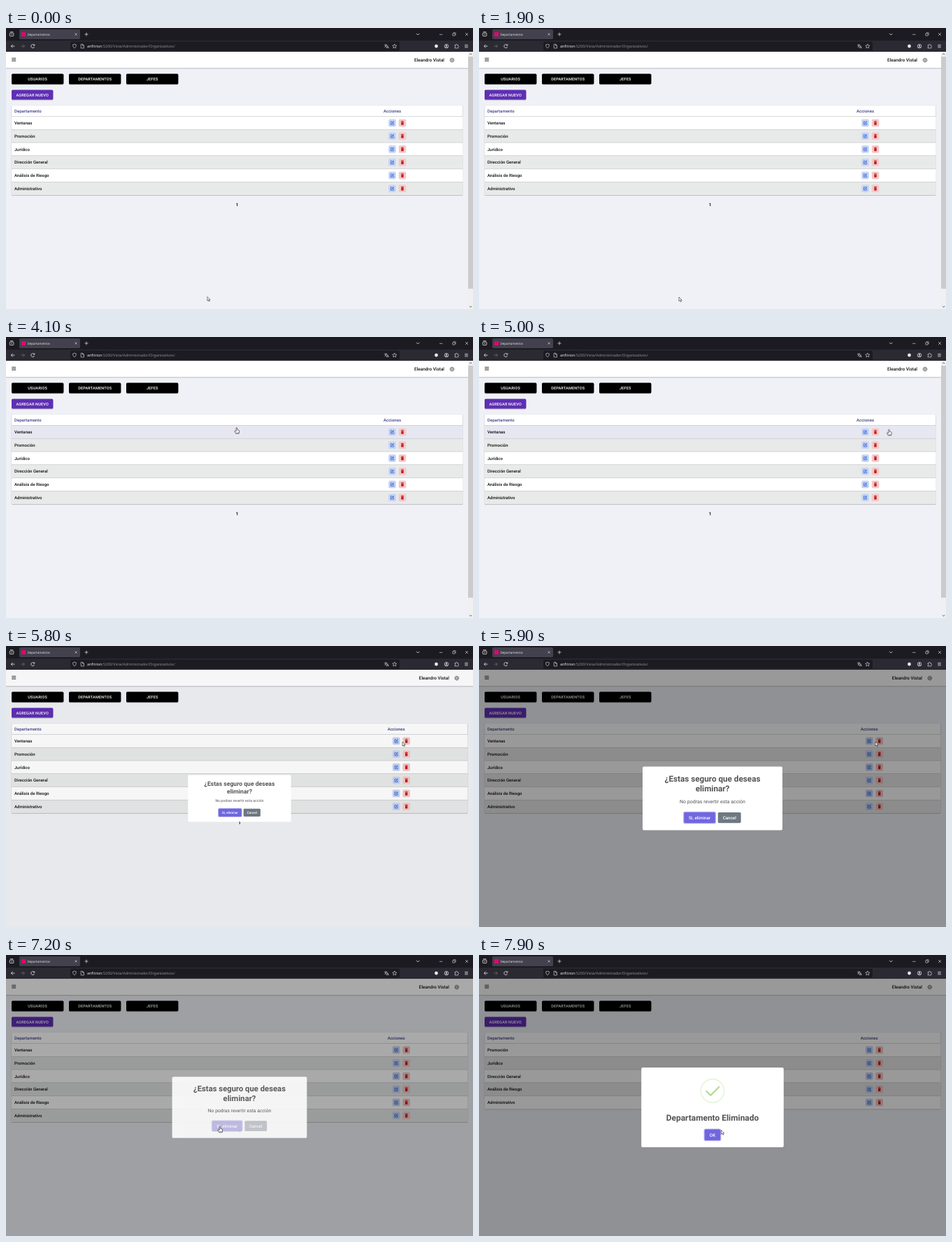
Write an HTML page that moves like this. It is 668 by 402 pixels and loops after 8000 ms.

```html
<!DOCTYPE html>
<html lang="es">
<head>
<meta charset="utf-8">
<title>Departamentos</title>
<style>
html, body { margin: 0; width: 100%; height: 100%; overflow: hidden; background: #f0f1f6; }
svg { display: block; width: 668px; height: 402px; font-family: Roboto, sans-serif; text-rendering: geometricPrecision; }
</style>
</head>
<body>
<svg id="stage" viewBox="0 0 668 402"></svg>
<script>
const LOOP = 8000, TICK = 100;
const OPEN_ASK = 5791, CLOSE_ASK = 7184, OPEN_DONE = 7250;
const ROW_TOP = 126.5, ROW_H = 18.75;
const ROWS = ['Ventanas', 'Promoción', 'Jurídico', 'Dirección General', 'Análisis de Riesgo', 'Administrativo'];
const UI = "'Open Sans', sans-serif";

const stage = document.getElementById('stage');
const clamp = v => Math.max(0, Math.min(1, v));
const lerp = (a, b, p) => a + (b - a) * p;

// SVG helpers
const rect = (x, y, w, h, fill, r = 0, more = '') =>
  `<rect x="${x}" y="${y}" width="${w}" height="${h}" rx="${r}" fill="${fill}" ${more}/>`;
const circle = (x, y, r, fill, more = '') => `<circle cx="${x}" cy="${y}" r="${r}" fill="${fill}" ${more}/>`;
const line = (d, color, w = .6, fill = 'none', more = '') =>
  `<path d="${d}" stroke="${color}" stroke-width="${w}" fill="${fill}" stroke-linejoin="round" ${more}/>`;
const text = (x, y, size, str, fill, weight = 500, anchor = 'start', more = '') =>
  `<text x="${x}" y="${y}" font-size="${size}" font-weight="${weight}" fill="${fill}" text-anchor="${anchor}" ${more}>${str}</text>`;
const group = (transform, body, more = '') => `<g transform="${transform}" ${more}>${body}</g>`;
const at = (x, y, body) => group(`translate(${x} ${y})`, body);

// Piecewise path through [time, x, y] points, eased between points
const PATH = [
  [0, 288, 384.5], [1800, 288, 384.5], [1900, 286, 385], [2700, 181.5, 322], [2900, 181.5, 322],
  [3400, 209.5, 149.3], [3800, 239, 129], [4700, 590, 131], [4800, 600, 133], [5000, 586.5, 132.2],
  [5300, 566, 140], [5400, 566, 140], [5600, 567, 137.2], [5900, 567, 137.2],
  [6600, 305.5, 244.8], [6900, 305.5, 244.8], [7000, 306, 245], [7200, 306, 245.2], [7800, 346.5, 250.8], [8000, 346.5, 250.5]
];
function pointer(t) {
  const i = PATH.findIndex(p => p[0] > t);
  const [t0, x0, y0] = PATH[i - 1], [t1, x1, y1] = PATH[i];
  const p = (t - t0) / (t1 - t0), e = p * p * (3 - 2 * p);
  return { x: lerp(x0, x1, e), y: lerp(y0, y1, e) };
}

function browser() {
  const c = '#e8e8ec', w = .7;
  return rect(0, 0, 668, 34, '#1c1b22') + rect(0, 18, 668, 16, '#2b2a33')
    + rect(5.3, 7, 5.6, 4.6, 'none', 1, `stroke="${c}" stroke-width=".8"`) + line('M6 5.6H10.2M7 9.2H9.2', c, w)
    + rect(19, 2, 87, 14, '#42414d', 1.8) + rect(22, 6, 6, 6, '#e5006d')
    + text(30.5, 10.7, 4.45, 'Departamentos', '#f2f2f5', 400, 'start', `font-family="${UI}"`)
    + line('M98.6 7.5l3 3m0-3l-3 3', c) + line('M115 6.5v5M112.5 9h5', c, w)
    + line('M587 7.8l2.2 2.2 2.2-2.2', c, .8) + line('M620 9.3h4.4M657 7l4 4m0-4l-4 4', c)
    + rect(638.8, 7.8, 3.3, 3.3, 'none', .4, `stroke="${c}" stroke-width=".6"`) + line('M640 7.7v-1h3.2v3.2h-1', c, .5)
    + line('M12.5 26H7.3M9.7 23.6L7.3 26l2.4 2.4', c, .8) + line('M21.3 26h5.2M24.1 23.6l2.4 2.4-2.4 2.4', '#6d6c75', .8)
    + line('M40.4 24.6A2.5 2.5 0 1 0 40.6 27M40.8 23.2v1.9h-1.9', c, .8)
    + rect(92, 19.5, 471, 13, '#1c1b22', 1.8)
    + line('M98 23l2.4 .9q.2 3.4-2.4 5q-2.6-1.6-2.4-5z', c)
    + line('M107.2 23.2h2.5l1.8 1.8v3.8h-4.3zM109.5 23.3v1.9h1.9', c)
    + text(116, 27.8, 5.4, 'anfitrion<tspan fill="#96959e">:5200/Vista/Administrador/Organizativos/</tspan>', '#fbfbfe', 400, 'start', `font-family="${UI}"`)
    + line('M541.2 24.2h4M543.2 23.2v1M544.6 24.2q-.6 2.2-3 3.2M542 25q.8 1.5 2 2.1M544.2 29l1.6-3.6 1.6 3.6M544.8 28h2', c)
    + line('M555.8 22.9l.9 2 2.2.2-1.7 1.5.5 2.2-1.9-1.2-1.9 1.2.5-2.2-1.7-1.5 2.2-.2z', c)
    + circle(615.5, 26, 2.4, c)
    + circle(630, 26, 2.8, 'none', `stroke="${c}" stroke-width=".7"`) + circle(630, 25.2, 1, c) + line('M628.3 27.7q1.7-1.8 3.4 0', c, .9)
    + line('M642 24.4h1.6v-.8q.8-1 1.6 0v.8h1.6v1.5h.4q.9.7 0 1.4h-.4v1.5H642v-1.4h.8q.8-.8 0-1.6H642z', c)
    + line('M656.2 24.2h4.6M656.2 26h4.6M656.2 27.8h4.6', c, w);
}

function navButton(x, y, w, h, label, fill) {
  return rect(x, y + .9, w, h, '#000', 1.6, 'opacity=".22"') + rect(x, y, w, h, fill, 1.6)
    + text(x + w / 2, y + h / 2 + 2, 5.57, label, '#fff', 500, 'middle', 'letter-spacing=".16"');
}

const editIcon = rect(-5.3, -5.3, 10.6, 10.6, '#c6d5f6', 1.8)
  + line('M.2-2H-2.2V2.4H2.2V.2', '#2a55c9', .75) + line('M-.8 .9L2.3-2.2', '#2a55c9', 1.1);
const trashIcon = rect(-5.3, -5.3, 10.6, 10.6, '#f5c9c9', 1.8)
  + line('M-2.1-2.1H2.1M-.7-2.7H.7', '#bd1f1f', .8) + rect(-1.7, -1.4, 3.4, 4.2, '#bd1f1f', .5);

function page(wide, rows, hover) {
  const W = wide ? 668 : 661.2, dx = wide ? 5.7 : 0, tw = W - 15.7;
  const bottom = ROW_TOP + ROW_H * rows.length;
  let s = rect(0, 34, 668, 368, '#f0f1f6')
    + rect(0, 57, W, 1.6, '#000', 0, 'opacity=".1"') + rect(0, 34, W, 23.4, '#fff') + rect(0, 57.1, W, .6, '#b9b9be')
    + line('M8.2 43.2h6M8.2 45.2h6M8.2 47.2h6', '#333', .9)
    + text(W - 34.2, 48.1, 6.4, 'Eleandro Vistal', '#111', 500, 'end')
    + at(W - 23.2, 46, circle(0, 0, 2.4, 'none', 'stroke="#444" stroke-width=".7"')
      + circle(0, 0, 2.9, 'none', 'stroke="#444" stroke-width=".8" stroke-dasharray="1.1 1.177"')
      + circle(0, 0, .9, 'none', 'stroke="#444" stroke-width=".6"'))
    + ['USUARIOS', 'DEPARTAMENTOS', 'JEFES'].map((l, i) => navButton(8 + 82 * i, 65.6, 74.4, 14.8, l, '#000')).join('')
    + navButton(8, 88.4, 59.4, 14.2, 'AGREGAR NUEVO', '#5e2fb3')
    + rect(7.8, 111, tw + .4, bottom - 110, '#000', 1.6, 'opacity=".22"')
    + rect(8, 110.6, tw, bottom - 110.6, '#fff', 1.4, 'stroke="#cfcfd4" stroke-width=".4"')
    + text(12, 120.8, 6.04, 'Departamento', '#40428a') + text(540 + dx, 120.8, 6.04, 'Acciones', '#40428a');
  rows.forEach((name, i) => {
    const y = ROW_TOP + ROW_H * i, mid = y + ROW_H / 2;
    s += rect(8, y, tw, ROW_H, i === hover ? '#e7e7f2' : i % 2 ? '#e8e9e9' : '#fff')
      + rect(8, y - .3, tw, .6, '#bfc0c4')
      + text(12, mid + 2.2, 6.04, name, '#111')
      + at(552.5 + dx, mid, editIcon) + at(567 + dx, mid, trashIcon);
  });
  s += text(W / 2, bottom + 15.5, 6.4, '1', '#111', 700, 'middle');
  if (!wide) s += rect(661, 34, 7, 368, '#f0f0f0') + rect(661, 41, 7, 332, '#cbcbcb')
    + line('M663 38.2l1.6-1.7 1.6 1.7M663 397.8l1.6 1.7 1.6-1.7', '#505050', .9);
  return s;
}

function dialogButton(x, y, w, label, fill, focus) {
  return (focus ? rect(x - 1.2, y - 1.2, w + 2.4, 17.8, '#7066e0', 2.6, 'opacity=".5"') : '')
    + rect(x, y, w, 15.4, fill, 1.6) + text(x + w / 2, y + 9.9, 6.36, label, '#fff', 500, 'middle');
}

const panel = h => rect(-101.8, -h / 2, 203.6, h, '#fff', 2);
const title = (y, str) => text(0, y, 11.93, str, '#545454', 700, 'middle');

function askDialog(hover, closing) {
  return panel(92.6) + title(-24.4, '¿Estas seguro que deseas') + title(-10, 'eliminar?')
    + text(0, 7, 7.16, 'No podras revertir esta acción', '#545454', 400, 'middle')
    + `<g opacity="${closing ? .4 : 1}">`
    + dialogButton(-41.4, 20.4, 45.3, 'Si, eliminar', hover ? '#655cca' : '#7066e0', true)
    + dialogButton(7.9, 20.4, 33.5, 'Cancel', '#6e7881') + '</g>';
}

function doneDialog(age) {
  const drawn = 25.9 * clamp((age / 750 - .5) / .34), spin = clamp((age - 212) / 298);
  const green = '#a5dc86';
  return panel(114)
    + circle(0, -23.7, 16.7, 'none', `stroke="${green}" stroke-opacity=".3" stroke-width="1.6"`)
    + (spin > 0 && spin < 1 ? circle(0, -23.7, 16.7, 'none',
      `stroke="${green}" stroke-width="1.6" stroke-dasharray="35 70" transform="rotate(${-45 - 360 * spin} 0 -23.7)"`) : '')
    + (drawn ? line('M-8.8-23.3l6.1 6.1L9.5-29.4', green, 2, 'none', `stroke-linecap="round" stroke-dasharray="${drawn} 60"`) : '')
    + title(18.7, 'Departamento Eliminado') + dialogButton(-11.2, 31.6, 22.4, 'OK', '#7066e0', true);
}

// Pop-in: grow, overshoot, settle
function pop(age) {
  const p = clamp(age / 300);
  if (p < .45) return lerp(.7, 1.05, p / .45);
  if (p < .8) return lerp(1.05, .95, (p - .45) / .35);
  return lerp(.95, 1, (p - .8) / .2);
}

const arrow = line('M0 0V5.8L1.4 4.5 2.4 6.7 3.3 6.3 2.4 4.2H4.2Z', '#111', .55, '#fff');
const hand = line('M-.8 .6Q0-.5 .8 .6V3.3L3 3.8Q3.8 4 3.7 5L3.2 8.6H-1.2L-3 5.4Q-2.9 4.1-1.6 4.9L-.8 5.5Z', '#111', .6, '#fff')
  + line('M-.9 7.6H2.9', '#111', .4);

function render(t) {
  const { x, y } = pointer(t);
  const modal = t >= OPEN_ASK, closing = t >= CLOSE_ASK, done = t >= OPEN_DONE;
  const row = Math.floor((y - ROW_TOP) / ROW_H);
  const hover = !modal && row >= 0 && row < ROWS.length ? row : -1;
  const onAsk = modal && !done && x > 292.6 && x < 338 && y > 238 && y < 254;
  const shade = done ? clamp(.34 + (t - OPEN_DONE) / 100)
    : closing ? clamp(1 - (t - CLOSE_ASK) / 100) : clamp((t - OPEN_ASK) / 100);

  let s = page(modal, done ? ROWS.slice(1) : ROWS, hover);
  if (modal) {
    const shut = closing ? (t - CLOSE_ASK) / 150 : 0;
    const size = done ? pop(t - OPEN_DONE) : closing ? 1 - .5 * shut : pop(t - OPEN_ASK);
    s += rect(0, 34, 668, 368, '#000', 0, `opacity="${.4 * shade}"`)
      + group(`translate(334 218) scale(${size})`,
        done ? doneDialog(t - OPEN_DONE) : askDialog(onAsk, closing), `opacity="${done ? 1 : 1 - shut}"`);
  }
  stage.innerHTML = s + browser() + at(x, y, hover >= 0 || onAsk ? hand : arrow);
}

const start = performance.now();
let last = -1;
function frame() {
  const t = Math.floor((performance.now() - start) % LOOP / TICK) * TICK;
  if (t !== last) render(last = t);
  requestAnimationFrame(frame);
}
frame();
</script>
</body>
</html>
```
